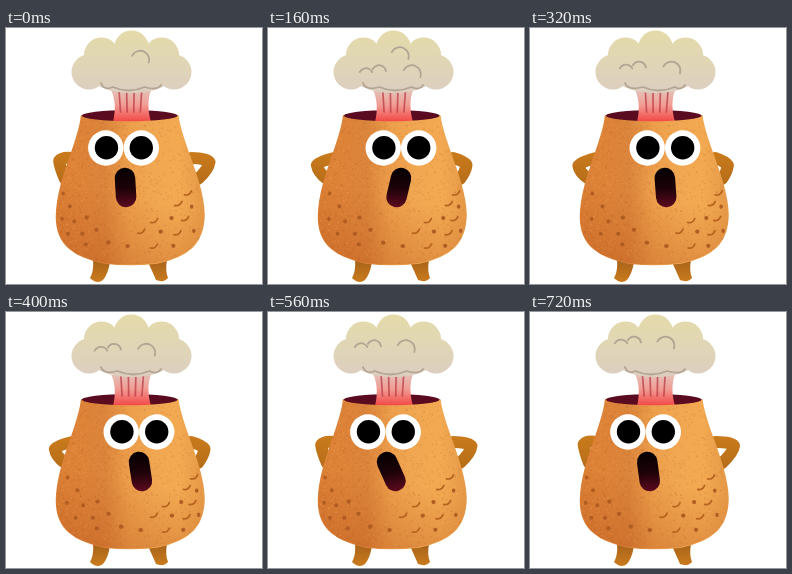
These frames come from a looping animation (256x256 px, 800 ms). An HTML page with a canvas:

```html
<!DOCTYPE html>
<html>
<head>
<meta charset="utf-8">
<style>
html, body { margin: 0; width: 100%; height: 100%; overflow: hidden; background: #fff; }
canvas { display: block; width: 100vw; height: 100vh; }
</style>
</head>
<body>
<canvas id="stage" width="256" height="256"></canvas>
<script>
const ctx = document.getElementById('stage').getContext('2d');
const STEP = 80, STEPS = 10, TAU = Math.PI * 2;

const wave = (step, lag) => Math.sin((step - lag) / STEPS * TAU);
// Sine that crosses the middle faster and rests longer at both ends.
const swing = step => wave(step, 1) + .12 * Math.sin(3 * (step - 1) / STEPS * TAU);

function seeded(seed) {
  return () => (seed = (seed * 16807) % 2147483647) / 2147483647;
}

function gradient(x0, y0, x1, y1, ...colors) {
  const g = ctx.createLinearGradient(x0, y0, x1, y1);
  colors.forEach((c, i) => g.addColorStop(i / (colors.length - 1), c));
  return g;
}

function disc(x, y, rx, color, ry = rx) {
  ctx.beginPath();
  ctx.ellipse(x, y, rx, ry, 0, 0, TAU);
  ctx.fillStyle = color;
  ctx.fill();
}

function line(width, color, path) {
  ctx.beginPath();
  path();
  ctx.lineWidth = width;
  ctx.strokeStyle = color;
  ctx.lineCap = ctx.lineJoin = 'round';
  ctx.stroke();
}

const body = new Path2D(`M75.5 88 C74 112 51 152 50.5 188 C50 218 70 229 98 235
  Q124 238 151 235 C181 229 198 216 198 186 C197 152 174 112 172 88
  A48.25 6 0 0 1 75.5 88Z`);

const cloud = new Path2D();
function puff(x, y, rx, ry) {
  cloud.moveTo(x + rx, y);
  cloud.ellipse(x, y, rx, ry, 0, 0, TAU);
}
puff(125.5, 45, 43, 20);
for (let i = 0; i < 5; i++) {
  const a = i / 4 * Math.PI;
  puff(125.5 - 42.5 * Math.cos(a), 44 - 24 * Math.sin(a), 17.5, 17.5);
}

const random = seeded(73);

// Spots fill a band that is high at the sides and low in the middle.
const spots = [];
for (let row = 0; row < 5; row++) {
  for (let col = 0; col < 8; col++) {
    const angle = -1.15 + col * .31 + (row % 2) * .15 + (random() - .5) * .12;
    const y = 165 + row * 13 + (random() - .5) * 5;
    if (y > 208 - 42 * Math.abs(angle) && y < 229 - 14 * Math.abs(angle)) {
      spots.push({ angle, y, crease: angle > .1 && (row + col) % 2 });
    }
  }
}

const grain = Array.from({ length: 1400 }, () => ({
  x: 50 + 148 * random() ** 1.3, y: 92 + 144 * random(), dark: random() < .6
}));

function drawArms(turn) {
  const color = gradient(0, 122, 0, 158, '#cb7c1c', '#b56c18');
  const arm = (shoulder, x, y, hand, bend) => line(12, color, () => {
    ctx.moveTo(shoulder, 130);
    ctx.quadraticCurveTo(x + bend, y - 4, x, y);
    ctx.quadraticCurveTo(x + bend / 3, y + 7, hand, 151);
  });
  arm(66, 51 - turn * 3, 135 + turn * 3, 59, 3);
  arm(185, 201 - turn * 3.5, 135.5 + turn * 2, 192, -3);
}

function drawFeet() {
  ctx.fillStyle = gradient(0, 232, 0, 255, '#a8631a', '#cb7c1c');
  ctx.fill(new Path2D('M87 232 L104 234 Q102 246 97 252 Q91 257 84 250 Q88 243 87 232Z'));
  ctx.fill(new Path2D('M142 234 L161 232 Q159 243 162 250 Q158 255 150 252 Q147 245 142 234Z'));
}

function drawStem(step) {
  disc(123.75, 88, 48.5, '#5b0b20', 6);
  ctx.fillStyle = gradient(0, 60, 0, 95, '#e2c8bd', '#f19a92', '#f2403f');
  ctx.fill(new Path2D('M103 58 Q112 73 107 94 Q124 97 145 94 Q139 73 147 58Z'));
  for (let i = 0; i < 4; i++) {
    const x = 114 + i * 7.5 + wave(step, 1) * 1.5;
    line(1.7, 'rgba(185,60,70,.75)', () => {
      ctx.moveTo(x, 64);
      ctx.lineTo(x + (125 - x) * .12, 84);
    });
  }
}

function drawCloud(step) {
  const ink = '#b3a493';
  const arch = (x, y, r, end) =>
    line(1.8, ink, () => ctx.arc(x, y, r, Math.PI * 1.15, Math.PI * end));

  ctx.fillStyle = gradient(0, 3, 0, 66, '#e4daa9', '#e0d6b6', '#dccdc0');
  ctx.fill(cloud);
  ctx.save();
  ctx.clip(cloud);

  // Billows form low in the cloud, rise, and vanish near the top.
  for (let age = (step + 9) % STEPS; age < 12; age += STEPS) {
    const y = 48 - age * 1.8;
    arch(145 - age * 1.2, y, 9, 2.1);
    if (age < 9) {
      arch(99 - age, y + 1, 7, 1.85);
      arch(112 - age, y - 2, 7, 1.95);
    }
  }

  // Scallops hang along the underside.
  line(1.8, ink, () => {
    const shift = wave(step, 1) * 4;
    ctx.moveTo(95, 55);
    ctx.quadraticCurveTo(98, 63, 109 + shift, 59);
    ctx.quadraticCurveTo(125 + shift, 66, 141 + shift, 59);
    ctx.quadraticCurveTo(151, 63, 155, 57);
  });
  ctx.restore();
}

function drawBody(turn) {
  const skin = gradient(50, 0, 198, 0,
    '#dc8136', '#dd8338', '#db843b', '#ed9f4b', '#f1a751', '#f2a951', '#e59846');
  ctx.fillStyle = skin;
  ctx.fill(body);
  ctx.lineWidth = 1.5;
  ctx.strokeStyle = skin;
  ctx.stroke(body);

  ctx.save();
  ctx.clip(body);
  ctx.fillStyle = gradient(110, 165, 95, 237, 'rgba(190,90,30,0)', 'rgba(185,85,28,.4)');
  ctx.fillRect(48, 160, 152, 78);
  for (const { x, y, dark } of grain) {
    ctx.fillStyle = dark ? 'rgba(165,80,28,.18)' : 'rgba(255,200,120,.16)';
    ctx.fillRect(x, y, 1.3, 1.3);
  }
  for (const { angle, y, crease } of spots) {
    const x = 124 + (69 + (y - 160) * .06) * Math.sin(angle + turn * .13);
    if (crease) {
      line(1.7, '#b8631f', () => {
        ctx.moveTo(x - 3, y + 1);
        ctx.quadraticCurveTo(x + 2, y + 2, x + 4, y - 3);
      });
    } else {
      disc(x, y, 2.3 * Math.cos(angle * .6), '#b05c22', 2.1);
    }
  }
  ctx.restore();
}

function drawFace(step, turn) {
  for (const x of [107.5, 143]) disc(x + turn * 11, 120, 17.7, '#fff');
  for (const x of [108.2, 143]) disc(x + turn * 11, 119.8, 11.7, '#000');

  const top = 126 + turn * 10, bottom = 128 + wave(step, 1.9) * 8.5;
  line(20.5, gradient(top, 140, bottom, 180, '#050002', '#1c0208', '#5f0a20'), () => {
    ctx.moveTo(top, 150);
    ctx.lineTo(bottom, 169);
  });
}

function draw() {
  const step = Math.floor(performance.now() / STEP) % STEPS;
  const turn = swing(step);
  ctx.fillStyle = '#fff';
  ctx.fillRect(0, 0, 256, 256);
  drawArms(turn);
  drawFeet();
  drawStem(step);
  drawCloud(step);
  drawBody(turn);
  drawFace(step, turn);
  requestAnimationFrame(draw);
}
draw();
</script>
</body>
</html>
```
